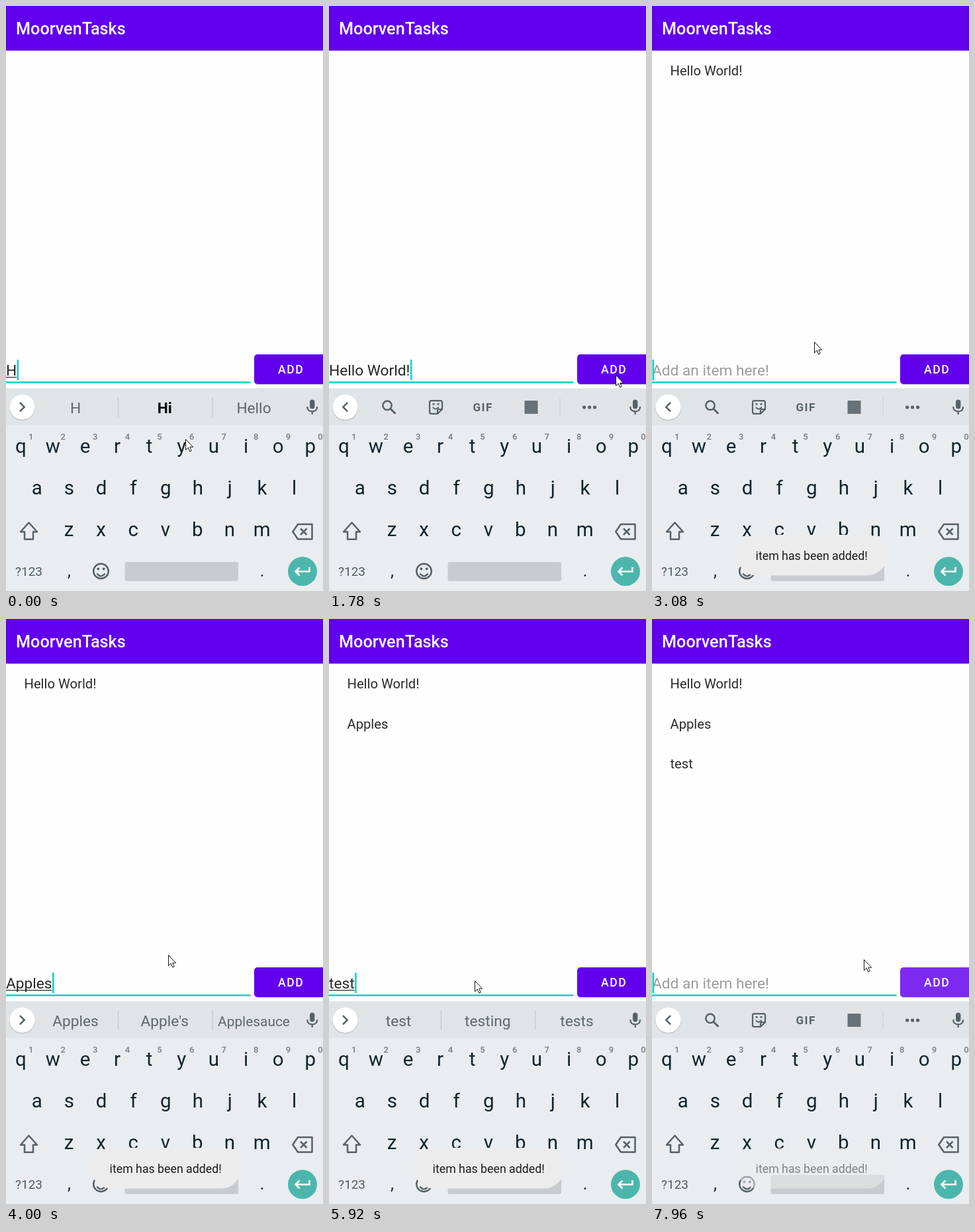
Write an HTML page that moves like this. It is 479 by 885 pixels and loops after 8 s.

```html
<!DOCTYPE html>
<html lang="en">
<head>
<meta charset="utf-8">
<title>To-do list</title>
<style>
  html, body { margin: 0; width: 100%; height: 100%; overflow: hidden; background: #fefefe; }
  svg { display: block; width: 479px; height: 885px; }
  text { font-family: Roboto, sans-serif; white-space: pre; }
  .mid { text-anchor: middle; }
  .line { fill: none; stroke: #566268; stroke-width: 2.5; }
</style>
</head>
<body>
<svg viewBox="0 0 479 885" xmlns="http://www.w3.org/2000/svg">
  <rect width="479" height="885" fill="#fefefe"/>
  <rect width="479" height="67.5" fill="#6200ee"/>
  <text x="15" y="43" font-size="25.2" font-weight="500" fill="#fff">MoorvenTasks</text>
  <g id="list" font-size="20.2" fill="#2b2b2b"></g>

  <rect y="568" width="369.5" height="2.6" fill="#12d4c2"/>
  <text id="input" y="559" font-size="22.7"></text>
  <rect id="underline" y="561" height="1.3" fill="#333"/>
  <rect id="caret" y="535" width="2.6" height="31" fill="#12d4c2"/>

  <rect x="375" y="528.5" width="112" height="45" rx="5" fill="#000" opacity=".16"/>
  <rect x="375" y="527" width="112" height="45" rx="5" fill="#6200ee"/>
  <rect id="ripple" x="375" y="527" width="112" height="45" rx="5" fill="#fff"/>
  <text x="411" y="556.3" font-size="17.6" font-weight="500" letter-spacing="1.57" fill="#fff">ADD</text>

  <rect y="578.5" width="479" height="307" fill="#e9edf0"/>
  <rect y="578.5" width="479" height="55.5" fill="#e0e4e7"/>
  <circle cx="24.5" cy="608" r="19.5" fill="#000" opacity=".12"/>
  <circle cx="24.5" cy="606.7" r="19" fill="#fff"/>
  <path id="chevron" class="line"/>

  <g id="suggestions">
    <path d="M169.5 592V622M312 592V622" stroke="#c3c9cd" stroke-width="1.3"/>
  </g>

  <g id="tools">
    <circle class="line" cx="88" cy="604.3" r="6.7"/>
    <path class="line" d="M92.8 609.2L100.3 616.8" style="stroke-width:3"/>
    <path class="line" d="M164 616.8H154.5Q152 616.8 152 614.3V599.7Q152 597.2 154.5 597.2H168.5Q171 597.2 171 599.7V610ZM164 616.5V612.5Q164 610 166.5 610H171" style="stroke-width:2.2"/>
    <path class="line" d="M156.8 607Q161 612.5 165.8 607" style="stroke-width:2"/>
    <path d="M156.5 602.2h3M163.5 602.2h3" stroke="#566268" stroke-width="2.4"/>
    <text class="mid" x="232.6" y="612.6" font-size="17" font-weight="700" letter-spacing="1.4" fill="#566268">GIF</text>
    <rect x="295.5" y="597" width="20" height="20" fill="#677278"/>
    <path d="M349 592.5V621" stroke="#cdd2d5" stroke-width="1.3"/>
    <g fill="#566268">
      <circle cx="385.6" cy="607" r="2.6"/><circle cx="393.6" cy="607" r="2.6"/><circle cx="401.6" cy="607" r="2.6"/>
    </g>
  </g>

  <rect x="459" y="595.5" width="7.4" height="14" rx="3.7" fill="#566268"/>
  <path class="line" d="M455.3 606Q455.3 613.3 462.7 613.3T470.1 606M462.7 613V618" style="stroke-width:2.2"/>

  <g id="keys" fill="#10242d"></g>
  <path class="line" d="M34.5 781.5L47 795.5H41V806.7H28V795.5H22Z" stroke-linejoin="round"/>
  <path class="line" d="M441 784H462.5V806.5H441L433.3 795.2ZM445 790.5L454.5 800M454.5 790.5L445 800" stroke-linejoin="round"/>
  <text class="mid" x="34.5" y="862.3" font-size="19" fill="#4d5b62">?123</text>
  <circle class="line" cx="143.5" cy="855" r="11.3"/>
  <path class="line" d="M137.3 858.5Q143.5 866.5 149.7 858.5" style="stroke-width:2.2"/>
  <g fill="#566268"><circle cx="139.3" cy="851.5" r="1.9"/><circle cx="147.7" cy="851.5" r="1.9"/></g>
  <rect x="179.5" y="841" width="171.5" height="29" rx="3" fill="#c8ccd0"/>
  <circle cx="448" cy="855.3" r="22" fill="#4db6ac"/>
  <path d="M458.5 849V855.5H438M443.5 849.5L437.5 855.5L443.5 861.5" fill="none" stroke="#fff" stroke-width="2.6"/>

  <g id="toast">
    <rect x="128" y="800" width="227.5" height="61.5" rx="30.7" fill="#ececec"/>
    <text class="mid" x="241.2" y="837.6" font-size="17.75" fill="#1c1c1c">item has been added!</text>
  </g>

  <path id="pointer" d="M.5 .5V16.6L4.3 13.1L6.7 18.9L9.2 17.9L6.8 12.2H11.6Z" fill="#fff" stroke="#111"/>
</svg>

<script>
const LOOP = 8000;
const $ = id => document.getElementById(id);

function addText(parent, x, y, content, attrs = {}) {
  const el = document.createElementNS('http://www.w3.org/2000/svg', 'text');
  for (const [key, value] of Object.entries({ x, y, ...attrs })) el.setAttribute(key, value);
  el.textContent = content;
  return parent.appendChild(el);
}

// Keyboard letters and their small digits
const KEY_STEP = 48.6;
[['qwertyuiop', 22.3, 676], ['asdfghjkl', 46.8, 739], ['zxcvbnm', 95, 802]].forEach(([row, x, y]) =>
  [...row].forEach((ch, i) =>
    addText($('keys'), x + i * KEY_STEP, y, ch, { class: 'mid', 'font-size': 29.5 })));
[...'1234567890'].forEach((ch, i) =>
  addText($('keys'), 37.6 + i * KEY_STEP, 656.3, ch,
    { class: 'mid', 'font-size': 13, 'font-weight': 500, fill: '#737d83' }));
addText($('keys'), 95.5, 863, ',', { class: 'mid', 'font-size': 25 });
addText($('keys'), 387, 863, '.', { class: 'mid', 'font-size': 25 });

const items = ['Hello World!', 'Apples', 'test'];
const itemTexts = items.map((item, i) => addText($('list'), 27.5, 105.4 + i * 60.3, item));
const words = [105, 239.8, 374.5].map(x => addText($('suggestions'), x, 616, '', { class: 'mid' }));

// [time, typed text, suggestions]; without suggestions the tool row shows
const typing = [
  [0, 'H', 'H|*Hi|Hello'],
  [60, 'He', 'He|Hey|Hello'],
  [240, 'Hel', 'Hel|Help|Hello'],
  [350, 'Hell', 'Hell|Hello|Hells'],
  [460, 'Hello', 'Hello|Hellos|Hello\'s'],
  [570, 'Hello ', 'there|my|World'],
  [680, 'Hello W', 'W|What|We'],
  [790, 'Hello Wo', 'Wo|World|Would'],
  [900, 'Hello Wor', 'Wor|Work|World'],
  [1010, 'Hello Worl', 'Worl|World|Worlds'],
  [1130, 'Hello World', 'World|World\'s|Worlds'],
  [1440, 'Hello World!'],
  [2080, ''],
  [3270, 'A', 'A|And|Am'],
  [3380, 'Ap', 'Ap|Apple|April'],
  [3480, 'App', 'App|Apple|Apps'],
  [3590, 'Appl', 'Appl|Apple|Apply'],
  [3690, 'Apple', 'Apple|Apples|Applesauce'],
  [4000, 'Apples', 'Apples|Apple\'s|Applesauce'],
  [4520, ''],
  [5300, 't', 't|the|to'],
  [5460, 'te', 'te|tell|ten'],
  [5630, 'tes', 'tes|test|tests'],
  [5920, 'test', 'test|testing|tests'],
  [7716, '']
];
const clicks = typing.filter(([, text]) => !text).map(([time]) => time);
const toasts = [2330, 4780, 7850];

// [time, x, y] of the pointer tip
const path = [
  [0, 271, 655], [1440, 271, 655], [1750, 433, 558], [2240, 433, 558], [2690, 245, 508],
  [4040, 245, 508], [4360, 430, 555], [4600, 430, 555], [4890, 230, 549], [5000, 220, 547],
  [6250, 220, 547], [6410, 246, 547], [6630, 246, 547], [7000, 322, 543], [7160, 322, 543],
  [7480, 428, 553], [7740, 428, 553], [7960, 320, 515], [8000, 318, 514]
];

const clamp = v => Math.max(0, Math.min(1, v));
const ease = v => v * v * (3 - 2 * v);
const measure = document.createElement('canvas').getContext('2d');
function textWidth(text, size) {
  measure.font = `${size}px Roboto, sans-serif`;
  return measure.measureText(text).width;
}
const show = (el, on) => el.setAttribute('visibility', on ? 'visible' : 'hidden');

function drawInput(t) {
  const [since, text, hints] = typing.findLast(step => step[0] <= t);
  const input = $('input');
  input.textContent = text || 'Add an item here!';
  input.setAttribute('fill', text ? '#262626' : '#9c9c9c');

  const width = textWidth(text, 22.7);
  const wordStart = textWidth(text.slice(0, text.lastIndexOf(' ') + 1), 22.7);
  $('underline').setAttribute('x', wordStart);
  $('underline').setAttribute('width', hints ? Math.max(0, width - wordStart) : 0);
  $('caret').setAttribute('x', width + 0.5);
  show($('caret'), (t - since) % 1000 < 500);

  show($('suggestions'), hints);
  show($('tools'), !hints);
  $('chevron').setAttribute('d', hints ? 'M21 600L27.7 606.7L21 613.4' : 'M28 600L21.3 606.7L28 613.4');
  if (!hints) return;
  hints.split('|').forEach((hint, i) => {
    const bold = hint[0] === '*';
    const label = bold ? hint.slice(1) : hint;
    words[i].textContent = label;
    words[i].setAttribute('font-size', label.length > 9 ? 20.9 : 22.7);
    words[i].setAttribute('font-weight', bold ? 700 : 400);
    words[i].setAttribute('fill', bold ? '#050505' : '#5c676d');
  });
}

function drawPointer(t) {
  const next = Math.max(1, path.findIndex(p => p[0] > t));
  const [t0, x0, y0] = path[next - 1], [t1, x1, y1] = path[next];
  const k = ease((t - t0) / (t1 - t0));
  $('pointer').setAttribute('transform', `translate(${x0 + (x1 - x0) * k} ${y0 + (y1 - y0) * k})`);
}

function draw(t) {
  drawInput(t);
  drawPointer(t);
  itemTexts.forEach((el, i) => show(el, t >= clicks[i]));
  const glow = Math.max(...clicks.map(c =>
    0.24 * Math.min(clamp((t - c + 80) / 80), clamp((c + 450 - t) / 300))));
  $('ripple').setAttribute('opacity', glow);
  const fade = Math.max(...toasts.map(s =>
    Math.min(clamp((t - s) / 220), clamp((s + 2180 - t) / 220))));
  $('toast').setAttribute('opacity', fade);
}

const start = performance.now();
function tick() {
  draw((performance.now() - start) % LOOP);
  requestAnimationFrame(tick);
}
tick();
</script>
</body>
</html>
```
